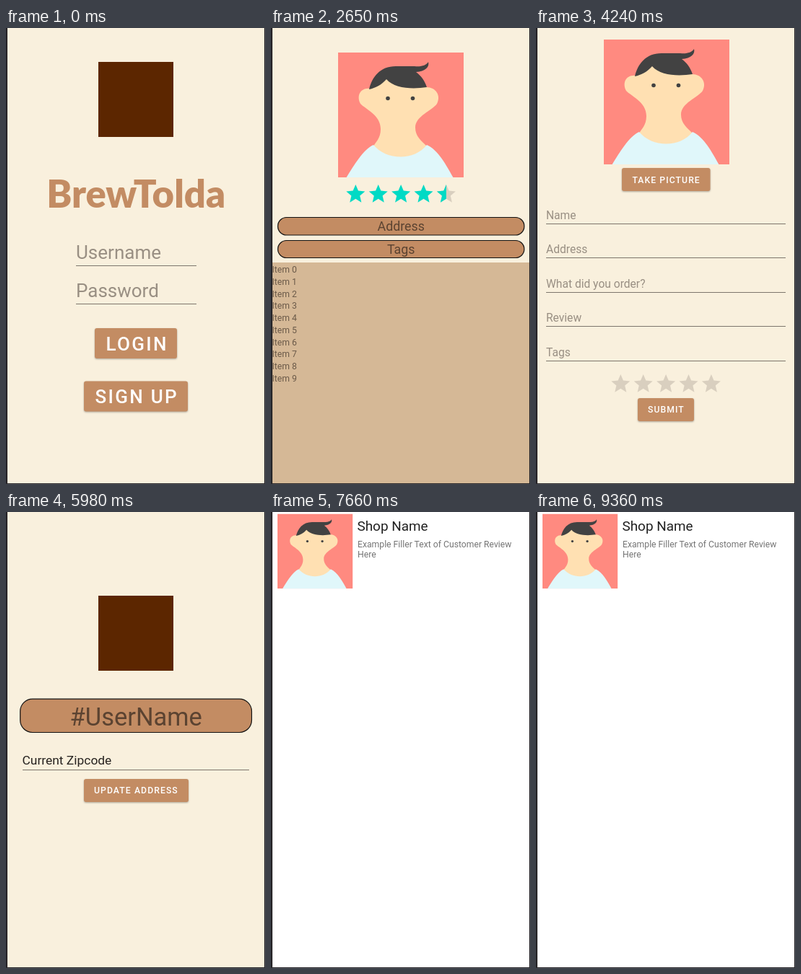
Recreate the animation shown at these times as an HTML page. Size 359 by 632 pixels, loop 9.88 s.

```html
<!DOCTYPE html>
<html lang="en">
<head>
<meta charset="utf-8">
<title>Coffee shop app</title>
<style>
html, body { margin: 0; width: 100%; height: 100%; overflow: hidden; background: #f9f0dd; }
svg { display: block; width: 359px; height: 632px; font-family: Roboto, sans-serif; }
.btn { filter: drop-shadow(0 1px 1px rgba(0, 0, 0, .3)); }
.title { font-family: Lato, sans-serif; font-weight: 900; }
</style>
</head>
<body>
<svg id="stage" viewBox="0 0 359 632">
  <defs>
    <clipPath id="square"><rect width="174" height="173"/></clipPath>
    <clipPath id="half"><rect width="12" height="24"/></clipPath>
    <path id="star" d="M12 17.27 18.18 21 16.54 13.97 22 9.24 14.81 8.63 12 2 9.19 8.63 2 9.24 7.46 13.97 5.82 21z"/>
    <g id="avatar" clip-path="url(#square)">
      <rect width="174" height="173" fill="#ff8a80"/>
      <path fill="#ffe0b2" d="M45 50C31 48 25 60 31 71C37 78 59 86 59 106C59 119 52 124 49 130L60 150H115L123 130C115 122 107 116 107 104C107 88 131 80 137 71C143 60 136 48 122 48L110 30H60Z"/>
      <path fill="#e0f7fa" d="M11 174C21 158 35 134 49 128C67 150 106 150 123 128C139 135 151 158 160 174Z"/>
      <path fill="#424242" d="M43 51C47 34 58 19 80 19H106C115 20 122 18 125 13C127 20 121 26 108 27C115 32 120 39 123 48C103 51 78 50 67 37C60 45 52 49 43 51Z"/>
      <circle cx="69" cy="63.5" r="2.8" fill="#424242"/>
      <circle cx="103.5" cy="63.5" r="2.8" fill="#424242"/>
    </g>
  </defs>
</svg>
<script>
const stage = document.getElementById('stage');
const LOOP = 9880;
const CREAM = '#f9f0dd', TAN = '#c38c63', HINT = '#998f83', RULE = '#7d766c', LABEL = '#5b4331';
const TEAL = '#00dac5', PALE = '#d9cfbf', EDGE = '#29272a';

const rect = (x, y, w, h, fill, extra = '') =>
  `<rect x="${x}" y="${y}" width="${w}" height="${h}" fill="${fill}" ${extra}/>`;
const text = (x, y, size, fill, str, extra = '') =>
  `<text x="${x}" y="${y}" font-size="${size}" fill="${fill}" ${extra}>${str}</text>`;
const centred = (y, size, fill, str, extra = '') =>
  text(180.2, y, size, fill, str, 'text-anchor="middle" ' + extra);
const rule = (x, y, w) => rect(x, y, w, 1, RULE);
const button = (x, y, w, h, tx, ty, size, str) =>
  rect(x, y, w, h, TAN, 'rx="3" class="btn"') +
  text(tx, ty, size, '#fff', str, `font-weight="500" letter-spacing="${size * 0.089}"`);
const pill = (x, y, w, h, r) => rect(x, y, w, h, TAN, `rx="${r}" stroke="#111" stroke-width="1.2"`);
const avatar = (x, y, k = 1) => `<use href="#avatar" transform="translate(${x} ${y}) scale(${k})"/>`;
const emblem = y => rect(128, y, 104, 104, '#5c2600');

function stars(y, score) {
  let out = '';
  for (let i = 0; i < 5; i++) {
    const fill = i + 1 <= score ? TEAL : PALE;
    const half = score > i && score < i + 1;
    out += `<g transform="translate(${101.7 + 31.4 * i} ${y}) scale(1.3)"><use href="#star" fill="${fill}"/>` +
      (half ? `<use href="#star" fill="${TEAL}" clip-path="url(#half)"/>` : '') + '</g>';
  }
  return out;
}

const login = emblem(47) +
  centred(249, 52.5, TAN, 'BrewTolda', 'class="title"') +
  text(97, 320, 26, HINT, 'Username') + rule(97, 329, 167) +
  text(97, 373, 26, HINT, 'Password') + rule(97, 382, 167) +
  button(123, 416, 114, 42, 138.5, 446.7, 26, 'LOGIN') +
  button(108, 489.5, 144, 42, 123.5, 520.2, 26, 'SIGN UP');

const shop = avatar(93, 34) + stars(214.4, 4.5) +
  pill(9.5, 262.5, 341.5, 24.5, 12) + centred(281, 17.8, LABEL, 'Address') +
  pill(9.5, 294.5, 341.5, 24, 12) + centred(313, 17.8, LABEL, 'Tags') +
  rect(0, 325, 359, 307, '#d5b896') +
  Array.from({ length: 10 }, (_, i) => text(1.5, 339 + 16.78 * i, 12.2, '#6b5a49', 'Item ' + i)).join('');

const review = avatar(94, 16) +
  button(119, 194, 122.5, 32, 133.5, 214.7, 12.2, 'TAKE PICTURE') +
  ['Name', 'Address', 'What did you order?', 'Review', 'Tags'].map((name, i) =>
    text(14, 265 + 47.4 * i, 15.6, HINT, name) + rule(14, Math.round(271 + 47.4 * i), 332)).join('') +
  stars(477.4, 0) +
  button(141, 513, 78, 32, 155, 533.3, 12.2, 'SUBMIT');

const profile = emblem(116) +
  pill(19.7, 259.2, 320.8, 46.3, 17) + centred(295.7, 34.5, LABEL, '#UserName') +
  text(22.5, 350.3, 17.4, '#26221f', 'Current Zipcode') + rule(23, 357, 314) +
  button(108, 370, 145, 32, 122, 390, 12.2, 'UPDATE ADDRESS');

const feed = rect(0, 0, 359, 632, '#fff') + avatar(9, 2.5, 0.6) +
  text(119.5, 26, 18.9, '#212121', 'Shop Name') +
  text(120, 48.5, 12.2, '#757575', 'Example Filler Text of Customer Review') +
  text(120, 62.7, 12.2, '#757575', 'Here');

// [start in ms, content]
const screens = [[0, login], [2650, shop], [4240, review], [5980, profile], [7660, feed]];

// [start in ms, x, y] of the pointer; no position means hidden
const pointerSteps = [[0], [8730, 347, 303], [8790, 343, 384], [8850, 338, 451],
  [9130, 340, 466], [9210, 335, 520], [9290, 327, 600], [9360]];

stage.insertAdjacentHTML('beforeend',
  rect(0, 0, 359, 632, CREAM) +
  screens.map(([, body]) => `<g class="screen">${body}</g>`).join('') +
  '<path id="pointer" fill="#fff" stroke="#000" d="M.5 .5V16.5L4.3 13L6.8 18.5L9 17.5L6.6 12H11.5Z"/>' +
  rect(0, 0, 2, 632, EDGE) + rect(358, 0, 1, 632, EDGE) + rect(0, 631, 359, 1, EDGE));

const layers = [...stage.querySelectorAll('.screen')];
const pointer = document.getElementById('pointer');
const stepAt = (steps, t) => steps.findLastIndex(([start]) => t >= start);

function draw(t) {
  const current = stepAt(screens, t);
  layers.forEach((layer, i) => layer.setAttribute('display', i === current ? 'inline' : 'none'));
  const [, x, y] = pointerSteps[stepAt(pointerSteps, t)];
  pointer.setAttribute('display', x === undefined ? 'none' : 'inline');
  if (x !== undefined) pointer.setAttribute('transform', `translate(${x} ${y})`);
}

const begin = performance.now();
function tick() {
  draw((performance.now() - begin) % LOOP);
  requestAnimationFrame(tick);
}
tick();
</script>
</body>
</html>
```
